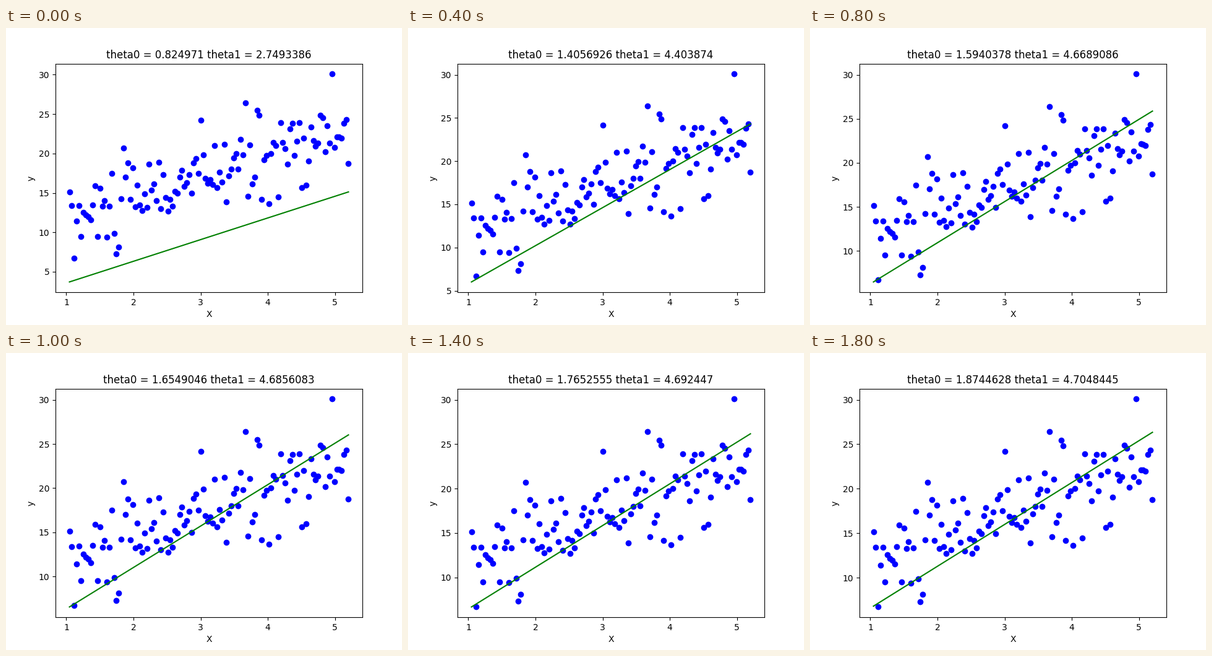
Write a matplotlib script that moves like this. It is 640 by 480 pixels and loops after 2 s.

```python
import numpy as np
import matplotlib.pyplot as plt
from matplotlib.animation import FuncAnimation

# Intercept and slope after each descent step
STEPS = [
    ("0.824971", "2.7493386"),
    ("1.2108384", "3.9148211"),
    ("1.4056926", "4.403874"),
    ("1.5156317", "4.5943618"),
    ("1.5940378", "4.6689086"),
    ("1.6549046", "4.6856083"),
    ("1.7109493", "4.6913223"),
    ("1.7652555", "4.692447"),
    ("1.8203614", "4.6981739"),
    ("1.8744628", "4.7048445"),
]

# Noisy samples around a straight trend
np.random.seed(10)
x = np.radians(np.arange(60, 300, 2))
y = 3 * x + 8 + np.random.normal(0, 3, len(x))

fig, ax = plt.subplots(figsize=(6.4, 4.8), dpi=100)
ax.plot(x, y, "bo")
fit, = ax.plot(x, x, "g")
ax.set_xlabel("X")
ax.set_ylabel("y")
title = ax.set_title("")


def update(step):
    theta0, theta1 = STEPS[step]
    fit.set_ydata(float(theta0) + float(theta1) * x)
    title.set_text(f"theta0 = {theta0} theta1 = {theta1}")
    ax.relim()
    ax.autoscale_view()
    return fit, title


anim = FuncAnimation(fig, update, frames=len(STEPS), interval=200,
                     repeat=True, repeat_delay=0)
plt.show()
```
